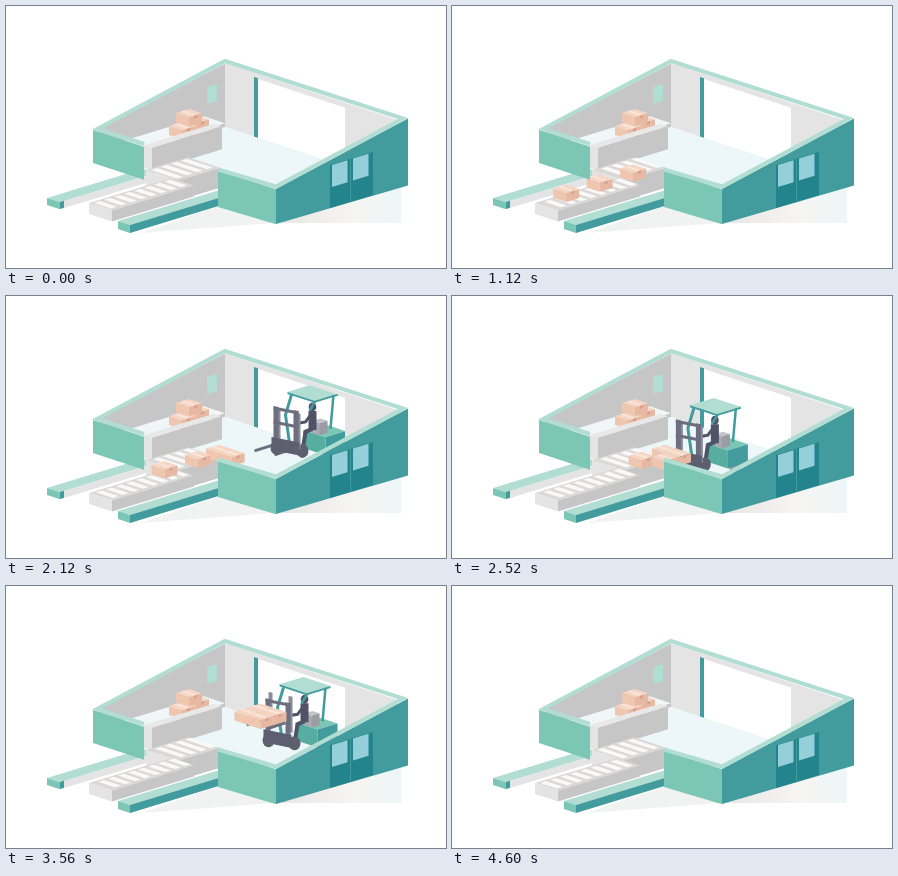
Recreate the animation shown at these times as an HTML page with a canvas. Size 440 by 262 pixels, loop 5.4 s.

```html
<!DOCTYPE html>
<html lang="en">
<head>
<meta charset="utf-8">
<title>Warehouse loop</title>
<style>
html, body { margin: 0; width: 100%; height: 100%; overflow: hidden; background: #fff; }
canvas { display: block; width: 440px; height: 262px; }
</style>
</head>
<body>
<canvas id="stage"></canvas>
<script>
const W = 440, H = 262, LOOP = 5400;
const UP = -0.305, DOWN = 0.33;   // screen slopes of the two floor axes
const SPEED = 280 / 3600;         // belt speed in px per ms
const TRUCK_SPEED = 0.109;
const TEAL = '#7bc6b4', DARK = '#429b9c', RIM = '#b1ddd2', GLASS = '#95cfd9';
const GREY = '#c7c6c7', PALE = '#e5e4e5', FLOOR = '#edf6f8';
const STEEL = '#6d6f7f', IRON = '#5d5f70', SUIT = '#505268';

const canvas = document.getElementById('stage');
const dpr = window.devicePixelRatio || 1;
canvas.width = W * dpr;
canvas.height = H * dpr;
const c = canvas.getContext('2d');

const span = (t, a, b) => Math.min(1, Math.max(0, (t - a) / (b - a)));
const smooth = p => p * p * (3 - 2 * p);

function path(...pts) {
  c.beginPath();
  for (let i = 0; i < pts.length; i += 2) c.lineTo(pts[i], pts[i + 1]);
}
function poly(color, ...pts) {
  path(...pts);
  c.fillStyle = color;
  c.fill();
}
function line(color, width, ...pts) {
  path(...pts);
  c.strokeStyle = color;
  c.lineWidth = width;
  c.stroke();
}
function disc(color, x, y, r) {
  c.beginPath();
  c.ellipse(x, y, r * 0.85, r, 0, 0, 7);
  c.fillStyle = color;
  c.fill();
}
// upright face from its top left corner
function panel(color, x, y, w, slope, h, hEnd = h) {
  const y2 = y + w * slope;
  poly(color, x, y, x + w, y2, x + w, y2 + hEnd, x, y + h);
}
// flat face from its left corner: a px along UP, b px along DOWN
function lid(color, x, y, a, b) {
  const ya = a * UP, yb = b * DOWN;
  poly(color, x, y, x + a, y + ya, x + a + b, y + ya + yb, x + b, y + yb);
}
function prism(x, y, a, b, h, top, left, right) {
  lid(top, x, y, a, b);
  panel(left, x, y, b, DOWN, h);
  panel(right, x + b, y + b * DOWN, a, UP, h);
}

const CRATE = 13;
function crate(x, y) {
  prism(x, y, CRATE, CRATE, 9, '#f5d5c3', '#efc6b0', '#e7b8a2');
  lid('#f9e6da', x + 5, y + 5 * UP, 3, CRATE);
  panel('#d9a08c', x + 18, y + 5 * UP + CRATE * DOWN, 3, UP, 3);
}

function backdrop() {
  const shade = c.createLinearGradient(276, 0, 395, 0);
  shade.addColorStop(0, '#e9e7e6');
  shade.addColorStop(0.6, '#f6f5f2');
  shade.addColorStop(1, FLOOR);
  c.fillStyle = shade;
  c.fillRect(276, 178, 119, 39);
  poly('#f1f3f2', 135, 227, 216, 199, 268, 217);
  panel(GREY, 93, 123, 126, -0.52, 14, 64);
  panel(PALE, 219, 57, 172, DOWN, 64);
  panel('#fff', 252, 73, 87, DOWN, 59);
  panel(DARK, 248, 71, 4, DOWN, 60);
  lid(FLOOR, 140, 145, 79, 140);
  panel(RIM, 201, 81, 10, UP, 17);
}

function platform() {
  lid('#f1f7f8', 117, 135, 81, 21);
  crate(177, 113);
  crate(163, 120);
  crate(170, 107);
  prism(138, 139, 70, 8, 23, '#e9e8e9', PALE, GREY);
}

function belt(x, y, len, wide, h, phase) {
  prism(x, y, len, wide, h, '#dad9d7', PALE, GREY);
  for (let d = 2 + phase; d < len - 4; d += 10) {
    lid('#f9f9f8', x + 3 + d, y + 0.5 + d * UP, 6, wide - 6);
  }
}

function conveyor(t) {
  const phase = span(t, 40, 3640) * 280 % 10;
  prism(41, 192, 96, 13, 7, RIM, TEAL, PALE);
  panel(DARK, 54, 196, 4, UP, 7);
  belt(140, 164, 42, 32, 20, phase);
  belt(83, 197, 82, 23, 11, phase);
  prism(112, 215, 100, 12, 8, RIM, TEAL, DARK);
}

function truck(lift) {
  // body, seat and driver
  disc('#9a9ca8', 283, 170, 7);
  prism(254, 147, 20, 22, 18, TEAL, '#57ad9f', DARK);
  prism(263, 138, 8, 7, 12, '#c3c3c8', '#a9aab0', '#9b9ca4');
  line(SUIT, 8, 263, 128, 263, 147);
  line(SUIT, 4, 263, 146, 256, 149, 254, 162);
  line(SUIT, 3, 262, 131, 256, 139, 250, 140);
  disc(SUIT, 263, 124, 4.5);
  // cab
  line(DARK, 3, 242, 112, 236, 132, 240, 160);
  line(DARK, 2.5, 284, 112, 281, 146);
  line(DARK, 2.5, 266, 118, 260, 128);
  prism(238, 109, 24, 27, 2, RIM, DARK, DARK);
  // mast and forks
  disc(IRON, 253, 168, 7);
  const slide = lift / 2;
  for (const x of [224, 244]) {
    const y = 123 + (x - 224) * 0.2;
    panel('#8a8c9a', x + 3, y + 3 - slide, 4, 0.2, 36);
    panel(STEEL, x, y, 5, 0.2, 42);
    line(STEEL, 3, x, y + 39 - lift, x - 19, y + 45 - lift);
  }
  for (const y of [125, 139]) line(STEEL, 3, 224, y, 249, y + 5);
  panel(IRON, 222, 154, 28, 0.2, 13);
  disc(IRON, 227, 165, 7);
}

function walls() {
  panel(TEAL, 87, 124, 51, DOWN, 33);
  panel(DARK, 270, 183, 132, -0.535, 35, 67);
  panel(TEAL, 212, 164, 58, DOWN, 37, 35);
  line(RIM, 4, 138, 138, 91, 123, 219, 55, 397, 112.5, 270, 180.5, 212, 163.5);
  panel('#23848d', 324, 159, 43, UP, 43);
  for (const x of [326, 347]) panel(GLASS, x, 159 + (x - 326) * UP, 15.5, UP, 22);
  line(DARK, 1, 344.5, 153, 344.5, 195);
}

// steps each crate takes on the floor once the belt has brought it in
const moves = ['ba', 'a', 'b', ''];
const step = { a: [CRATE, CRATE * UP], b: [CRATE, CRATE * DOWN] };
const RUN = 103;

function cargo(k, t) {
  const start = 40 + 430 * k, arrival = start + RUN / SPEED;
  if (t < start) return;
  const d = RUN * span(t, start, arrival);
  let x = 84 + d, y = 188 + d * UP;
  [...moves[k]].forEach((m, i) => {
    const from = arrival + 595 * i;
    const p = span(t, from, from + CRATE / SPEED);
    x += step[m][0] * p;
    y += step[m][1] * p;
  });
  c.globalAlpha = span(t, start, start + 120);
  crate(x, y);
  c.globalAlpha = 1;
}

// draws inside the part of the scene seen through or before the doorway
function inside(x, y, draw) {
  c.save();
  path(0, 0, 252, 0, 252, 72, 339, 101, 339, H, 0, H);
  c.clip();
  c.translate(x, y);
  draw();
  c.restore();
}

function draw(t) {
  c.setTransform(dpr, 0, 0, dpr, 0, 0);
  c.fillStyle = '#fff';
  c.fillRect(0, 0, W, H);

  const back = Math.max(0, t - 3180) * TRUCK_SPEED;
  const shift = back + Math.max(0, 2575 - t) * TRUCK_SPEED;
  const lift = 19 * smooth(span(t, 3180, 3600));
  const busy = t < 4600;

  backdrop();
  if (busy) inside(shift - 6, 2 + shift * UP, () => truck(lift));
  platform();
  conveyor(t);
  if (busy) inside(back, back * UP - lift, () => [1, 3, 0, 2].forEach(k => cargo(k, t)));
  walls();
}

const begin = performance.now();
function tick() {
  draw((performance.now() - begin) % LOOP);
  requestAnimationFrame(tick);
}
tick();
</script>
</body>
</html>
```
